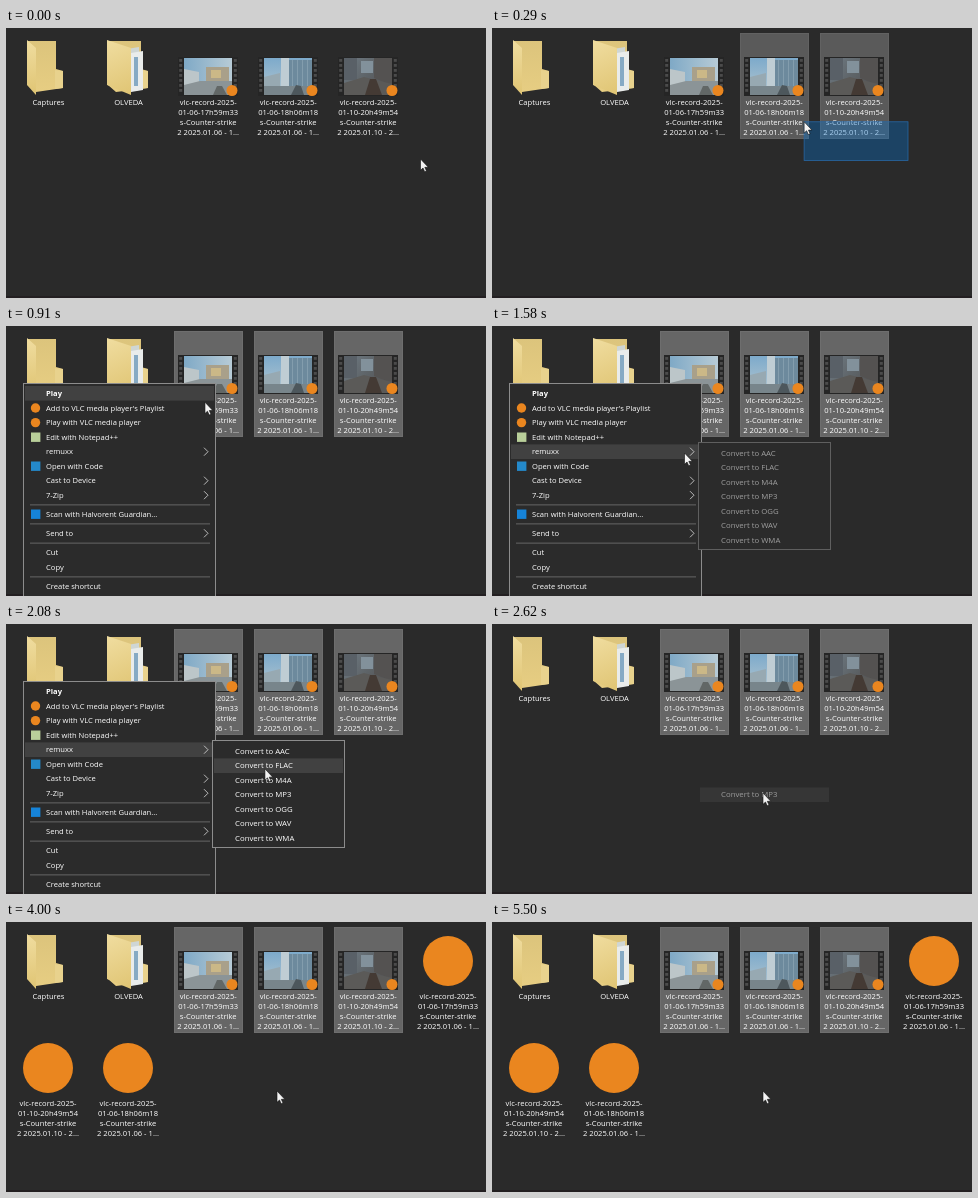
An HTML page with a canvas for the animation above (5640 ms loop, 480 px wide and 270 px high).

```html
<!DOCTYPE html>
<html lang="en">
<head>
<meta charset="utf-8">
<style>
html, body { margin: 0; width: 100%; height: 100%; overflow: hidden; background: #2a2a2a; }
canvas { display: block; width: 480px; height: 270px; }
</style>
</head>
<body>
<canvas id="stage" width="480" height="270"></canvas>
<script>
const ctx = document.getElementById('stage').getContext('2d');
const LOOP = 5640;
const FAMILY = '"Open Sans", "Noto Sans", sans-serif';
const ORANGE = '#ea861f';
const DRAG_START = [416, 132.5];

const clips = [
  { day: '06', stamp: '17h59m33', end: '1' },
  { day: '06', stamp: '18h06m18', end: '1' },
  { day: '10', stamp: '20h49m54', end: '2' }
];

const menuItems = [
  { label: 'Play', y: 67.3, bold: true },
  { label: "Add to VLC media player's Playlist", y: 82, dot: ORANGE },
  { label: 'Play with VLC media player', y: 96.6, dot: ORANGE },
  { label: 'Edit with Notepad++', y: 111.2, square: '#b9cf9a' },
  { label: 'remuxx', y: 125.7, arrow: true },
  { label: 'Open with Code', y: 140.2, square: '#2489ca' },
  { label: 'Cast to Device', y: 154.7, arrow: true },
  { label: '7-Zip', y: 169.2, arrow: true },
  { label: 'Scan with Halvorent Guardian...', y: 188.2, square: '#1683d8' },
  { label: 'Send to', y: 207.3, arrow: true },
  { label: 'Cut', y: 226.5 },
  { label: 'Copy', y: 241 },
  { label: 'Create shortcut', y: 260.2 }
];
const formats = ['AAC', 'FLAC', 'M4A', 'MP3', 'OGG', 'WAV', 'WMA'];
const formatY = i => 127.2 + i * 14.5;

// Cursor stops: time, x, y
const path = [
  [40, 414.5, 131], [540, 211, 57], [830, 211, 57], [910, 199, 76],
  [1160, 192.5, 127], [1640, 192.5, 127], [2000, 254, 137],
  [2040, 256, 139], [2250, 271, 169]
];

const clamp = v => Math.max(0, Math.min(1, v));
const progress = (t, start, end) => clamp((t - start) / (end - start));
const ease = p => p * p * (3 - 2 * p);

function cursorAt(t) {
  if (t <= path[0][0]) return path[0].slice(1);
  for (let i = 1; i < path.length; i++) {
    const [t0, x0, y0] = path[i - 1], [t1, x1, y1] = path[i];
    if (t < t1) {
      let p = progress(t, t0, t1);
      if (i === 1) p = ease(p);
      return [x0 + (x1 - x0) * p, y0 + (y1 - y0) * p];
    }
  }
  return path[path.length - 1].slice(1);
}

function rect(x, y, w, h, color) {
  ctx.fillStyle = color;
  ctx.fillRect(x, y, w, h);
}

function frame(x, y, w, h, color) {
  ctx.strokeStyle = color;
  ctx.lineWidth = 1;
  ctx.strokeRect(x + 0.5, y + 0.5, w - 1, h - 1);
}

function poly(points, color) {
  ctx.beginPath();
  points.forEach(([x, y]) => ctx.lineTo(x, y));
  ctx.closePath();
  ctx.fillStyle = color;
  ctx.fill();
}

function disc(x, y, r, color) {
  ctx.beginPath();
  ctx.arc(x, y, r, 0, Math.PI * 2);
  ctx.fillStyle = color;
  ctx.fill();
}

function text(label, x, y, { align = 'left', bold = false, size = 7.8 } = {}) {
  ctx.font = `${bold ? 'bold ' : ''}${size}px ${FAMILY}`;
  ctx.textAlign = align;
  ctx.fillStyle = '#fff';
  ctx.fillText(label, x, y);
}

function gradient(x0, y0, x1, y1, ...colors) {
  const g = ctx.createLinearGradient(x0, y0, x1, y1);
  colors.forEach((c, i) => g.addColorStop(i / (colors.length - 1), c));
  return g;
}

function at(x, y, draw) {
  ctx.save();
  ctx.translate(x, y);
  draw();
  ctx.restore();
}

function folder(x, label, full) {
  const back = full ? 34 : 29;
  const edge = full ? 24 : 9;
  at(x, 0, () => {
    poly([[1, 13], [back, 13], [back, 41], [back + 7, 43], [back + 7, 60], [9, 64], [1, 57]],
      gradient(0, 13, 0, 62, '#dcc47c', '#e6cd82'));
    poly([[back - 1, 42], [back + 7, 43], [back + 7, 60], [back - 1, 61]], '#e8d28d');
    if (full) {
      poly([[20, 21], [32, 19], [32, 62], [20, 64]], '#cfd6d4');
      poly([[24, 25], [36, 23], [36, 62], [24, 64]], '#e9eceb');
      rect(27, 29, 4, 29, '#86aac4');
    }
    poly([[0, 12], [edge, 20], [edge, 67], [0, 57]],
      gradient(0, 12, edge, 66, '#f0dda0', '#e0c574'));
  });
  text(label, x + 21.5, 77.3, { align: 'center', size: 7.6 });
}

function street() {
  rect(0, 0, 48, 37, gradient(0, 0, 48, 0, '#7fa9c6', '#b7cbd6'));
  poly([[0, 11], [15, 14], [15, 26], [0, 28]], '#bcc6c9');
  rect(22, 9, 23, 15, '#a9a08a');
  rect(27, 12, 10, 8, '#cbb887');
  poly([[0, 27], [16, 23], [48, 23], [48, 37], [0, 37]], '#8b9497');
  poly([[29, 37], [33, 28], [38, 28], [43, 37]], '#626766');
}

function tower() {
  rect(0, 0, 48, 37, gradient(0, 0, 0, 37, '#7daacb', '#b4c7d0'));
  poly([[0, 19], [16, 15], [16, 30], [0, 32]], '#97a9b2');
  rect(17, 0, 8, 28, '#bfcdd4');
  rect(25, 2, 23, 26, '#6d8a9d');
  for (let x = 28; x < 48; x += 5) rect(x, 2, 1, 26, '#839dad');
  rect(0, 28, 48, 9, '#78858b');
  poly([[27, 37], [32, 27], [37, 28], [40, 37]], '#4d575c');
}

function ruins() {
  rect(0, 0, 48, 37, gradient(0, 0, 48, 37, '#6f7b84', '#4b4a49'));
  rect(0, 0, 13, 22, '#596067');
  rect(17, 3, 12, 12, '#82919b');
  poly([[30, 0], [48, 0], [48, 27], [30, 20]], '#545251');
  poly([[0, 25], [20, 19], [48, 26], [48, 37], [0, 37]], '#5b5a58');
  poly([[21, 37], [26, 21], [32, 21], [38, 37]], '#443a34');
}
const scenes = [street, tower, ruins];

function clipLabel(clip, center, top) {
  const lines = ['vlc-record-2025-', `01-${clip.day}-${clip.stamp}`, 's-Counter-strike',
    `2 2025.01.${clip.day} - ${clip.end}...`];
  lines.forEach((line, i) => text(line, center, top + i * 10, { align: 'center', size: 7.6 }));
}

function video(i, selected, dragging) {
  const left = 168 + i * 80;
  if (selected) {
    rect(left, 5, 69, 106, dragging ? '#5a5a5a' : '#666');
    frame(left, 5, 69, 106, dragging ? '#626262' : '#6e6e6e');
  }
  at(left + 4, 29, () => {
    rect(0, 0, 60, 39, '#252525');
    for (let y = 2; y < 37; y += 5) {
      rect(1.2, y, 3, 2.8, '#4b4b4b');
      rect(55.8, y, 3, 2.8, '#4b4b4b');
    }
  });
  at(left + 10, 30, scenes[i]);
  disc(left + 58, 62.5, 5.5, ORANGE);
  clipLabel(clips[i], left + 34.2, 77.3);
}

function audio(clip, center, top) {
  disc(center, top + 39, 25, ORANGE);
  clipLabel(clip, center, top + 77.3);
}

function chevron(x, y) {
  ctx.beginPath();
  ctx.moveTo(x, y - 4);
  ctx.lineTo(x + 4, y);
  ctx.lineTo(x, y + 4);
  ctx.strokeStyle = '#ddd';
  ctx.lineWidth = 0.8;
  ctx.stroke();
}

function menu(hovered) {
  rect(17, 57, 193, 220, '#2b2b2b');
  frame(17, 57, 193, 220, '#8c8c8c');
  menuItems.forEach((item, i) => {
    if (i === hovered) rect(19, item.y - 7.3, 189, 14.6, '#414141');
    if (item.dot) disc(29.5, item.y, 4.7, item.dot);
    if (item.square) rect(25, item.y - 4.7, 9.4, 9.4, item.square);
    if (item.arrow) chevron(198, item.y);
    text(item.label, 40, item.y + 2.7, { bold: item.bold, size: 7.6 });
  });
  [178.5, 197.5, 216.7, 250.5].forEach(y => rect(24, y, 180, 0.8, '#757575'));
}

function formatItem(i, hovered) {
  if (hovered) rect(208, formatY(i) - 7.3, 129, 14.6, '#414141');
  text('Convert to ' + formats[i], 229, formatY(i) + 2.7);
}

function submenu(alpha, hovered) {
  ctx.save();
  rect(206, 116, 133, 108, '#2b2b2b');
  ctx.globalAlpha = alpha;
  frame(206, 116, 133, 108, '#8c8c8c');
  formats.forEach((_, i) => formatItem(i, i === hovered));
  ctx.restore();
}

function band(x, y) {
  const w = DRAG_START[0] - x, h = DRAG_START[1] - y;
  rect(x, y, w, h, 'rgba(0, 114, 210, 0.34)');
  ctx.strokeStyle = '#2766a3';
  ctx.lineWidth = 0.8;
  ctx.strokeRect(x, y, w, h);
}

function pointer(x, y) {
  at(x, y, () => {
    poly([[0, 0], [0, 11.3], [2.5, 9], [4.2, 12.8], [6, 12], [4.3, 8.3], [7.8, 8.3]], '#f4f4f4');
    ctx.strokeStyle = '#111';
    ctx.lineWidth = 0.6;
    ctx.stroke();
  });
}

function draw(t) {
  const [x, y] = cursorAt(t);
  const dragging = t >= 40 && t < 580;

  rect(0, 0, 480, 270, '#2a2a2a');
  rect(0, 268, 480, 2, '#231f21');
  folder(21, 'Captures', false);
  folder(101, 'OLVEDA', true);
  clips.forEach((_, i) => {
    const touched = dragging && y < 111 && x < 237 + i * 80;
    video(i, t >= 580 || touched, dragging);
  });

  if (t >= 3700) {
    audio(clips[0], 442, 0);
    audio(clips[2], 42, 107);
    audio(clips[1], 122, 107);
  }

  if (dragging) band(x, y);

  if (t >= 580 && t < 2450) {
    let hovered = -1;
    if (t >= 1160) hovered = 4;
    else if (t >= 830) hovered = menuItems.findIndex(item => Math.abs(y - 2 - item.y) <= 7.3);
    menu(hovered);
    if (t >= 1450) {
      const row = x > 208 ? Math.round((y - formatY(0)) / 14.5) : -1;
      submenu(progress(t, 1450, 1690), row);
    }
  } else if (t >= 2450 && t < 2800) {
    ctx.save();
    ctx.globalAlpha = 1 - progress(t, 2450, 2800);
    formatItem(3, true);
    ctx.restore();
  }

  pointer(x, y);
}

function tick() {
  draw(performance.now() % LOOP);
  requestAnimationFrame(tick);
}
tick();
</script>
</body>
</html>
```
